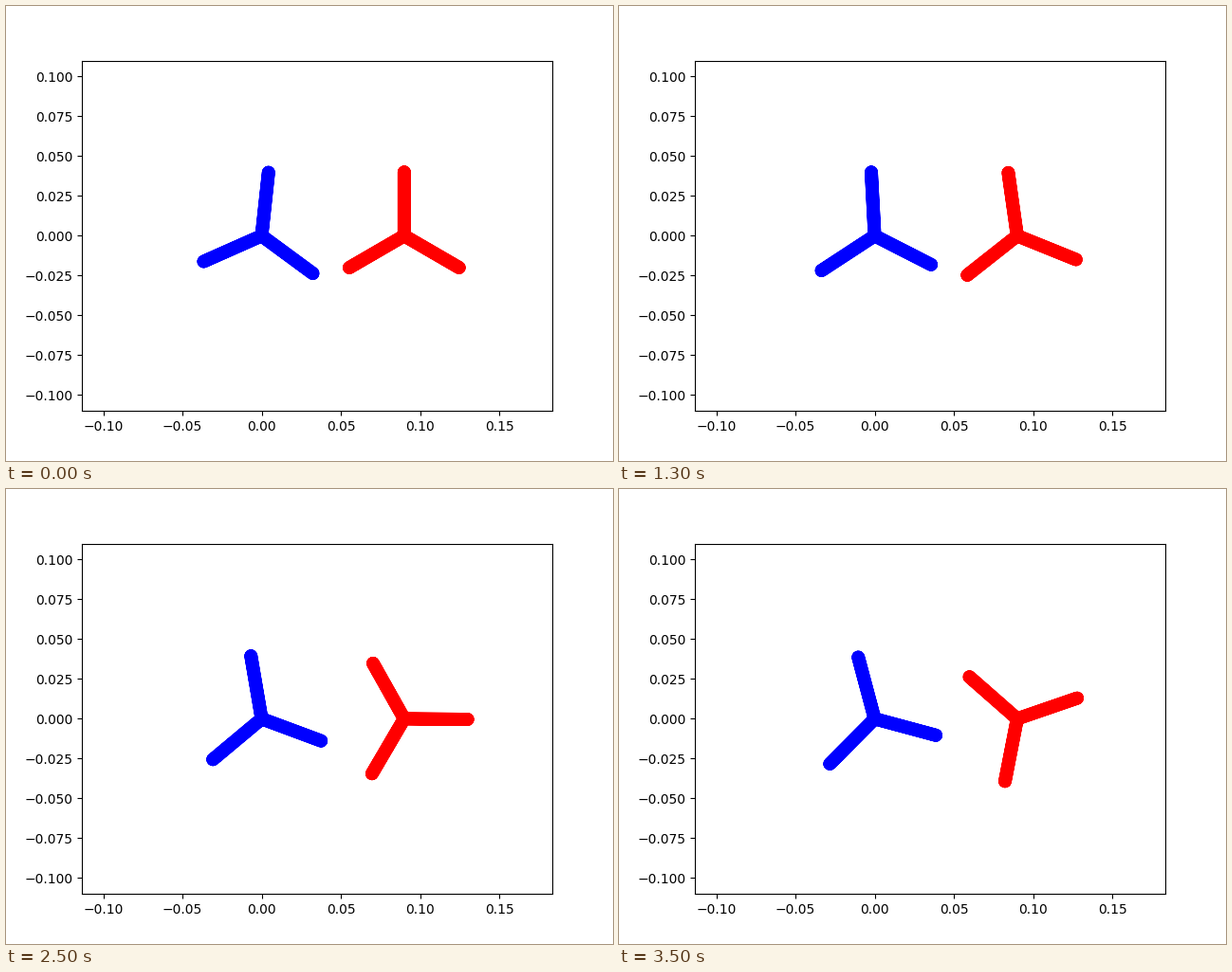
Recreate the animation shown at these times as a matplotlib script. Size 640 by 480 pixels, loop 3.6 s.

```python
import numpy as np
import matplotlib.pyplot as plt
from matplotlib.animation import FuncAnimation

FRAMES = 36
ARM = 0.04
KEYS = np.array([0, 6, 13, 17, 22, 29, 35])


def glide(angles, start_speed):
    """Smooth turn through the key angles, one value per frame (cubic Hermite)."""
    a = np.array(angles, float)
    v = np.gradient(a, KEYS, edge_order=2)
    v[0] = start_speed
    t = np.arange(FRAMES)
    i = np.clip(np.searchsorted(KEYS, t, side="right") - 1, 0, len(KEYS) - 2)
    h = KEYS[i + 1] - KEYS[i]
    s = (t - KEYS[i]) / h
    return ((1 + 2 * s) * (1 - s) ** 2 * a[i] + s * (1 - s) ** 2 * h * v[i]
            + s ** 2 * (3 - 2 * s) * a[i + 1] + s ** 2 * (s - 1) * h * v[i + 1])


def spinner(cx, turn):
    """Hub-tip-hub path of three arms, turned counter-clockwise by degrees."""
    angles = np.radians(turn + np.array([90, 210, 330]))
    x, y = np.full(7, cx), np.zeros(7)
    x[1::2] += ARM * np.cos(angles)
    y[1::2] += ARM * np.sin(angles)
    return x, y


fig, ax = plt.subplots(figsize=(6.4, 4.8), dpi=100)
ax.set_xlim(-0.1135, 0.1835)
ax.set_ylim(-0.11, 0.11)

style = dict(lw=10, solid_capstyle="round", solid_joinstyle="round")
spinners = [
    (ax.plot([], [], color="blue", **style)[0], 0.0,
     glide([-6.2, -1.0, 3.05, 5.0, 7.95, 12.0, 15.0], 1.0)),
    (ax.plot([], [], color="red", **style)[0], 0.09,
     glide([0, 1.0, 8.1, 13.9, 23.8, 37.0, 48.9], 0.0)),
]


def update(frame):
    for line, cx, turns in spinners:
        line.set_data(*spinner(cx, turns[frame]))
    return [line for line, _, _ in spinners]


anim = FuncAnimation(fig, update, frames=FRAMES, interval=100, repeat=True,
                     repeat_delay=0)
plt.show()
```
